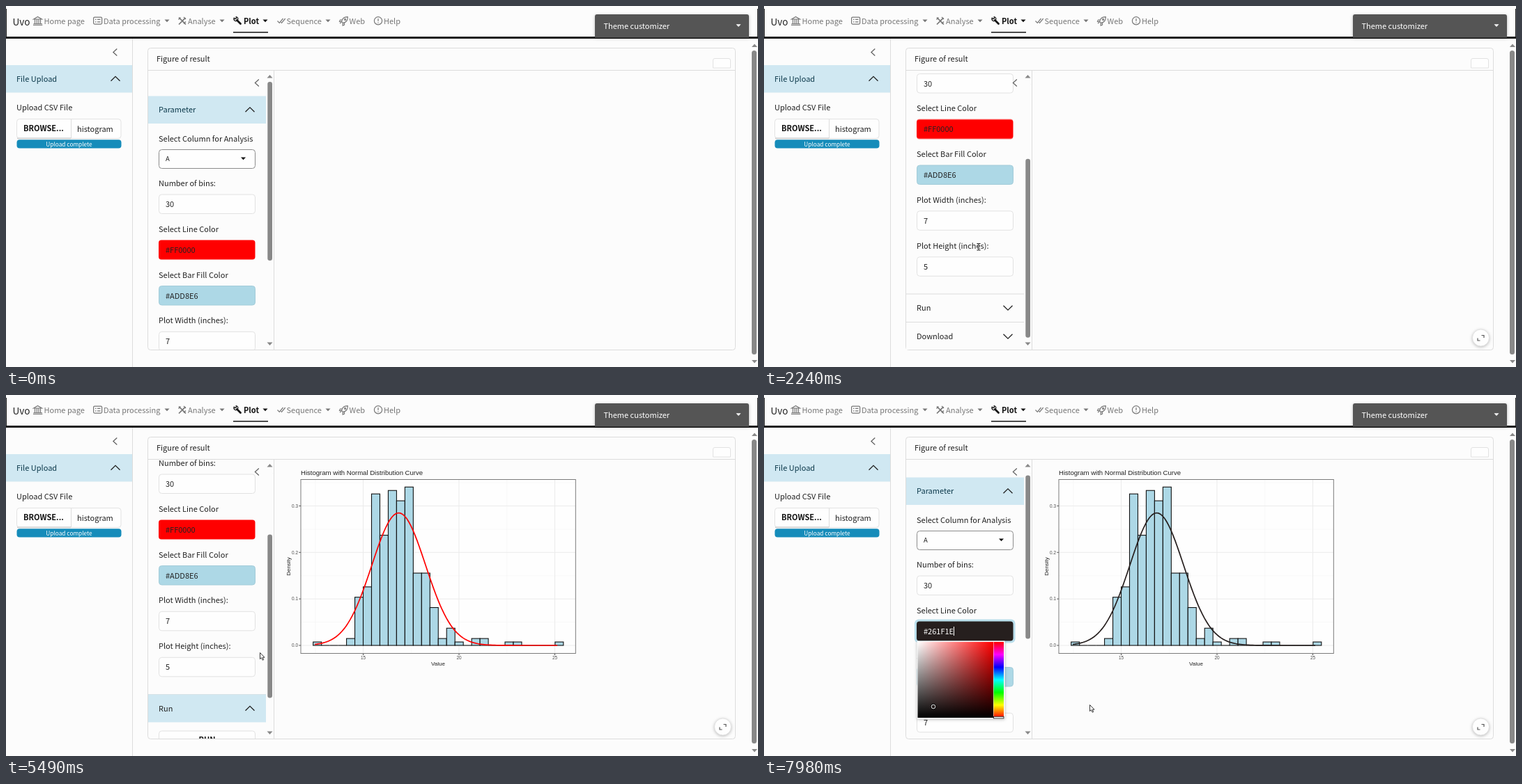
An HTML page that plays this animation: 1079 by 519 pixels, repeating every 8000 ms.

```html
<!DOCTYPE html>
<html lang="en">
<head>
<meta charset="utf-8">
<title>Histogram app</title>
<style>
@property --scroll { syntax: '<number>'; inherits: true; initial-value: 0; }
@property --open { syntax: '<number>'; inherits: true; initial-value: 0; }

html, body { margin: 0; width: 100%; height: 100%; overflow: hidden; background: #fcfcfc; }
#stage {
  display: block; width: 1079px; height: 519px;
  font: 11px "Noto Sans CJK SC", "Noto Sans CJK JP", "Noto Sans", sans-serif;
  fill: #222;
  animation: scroll 8s ease-out infinite, open 8s ease-in-out infinite;
}
text { white-space: pre; }
.line { fill: none; stroke: #dcdcdc; }
.in { fill: #fefefe; stroke: #e2e2e2; }
.head { fill: #d0e8f2; }
.on { fill: #0d3a4c; }
.chev { fill: none; stroke: #222; stroke-width: 1.3; }
.nav { fill: #777; }
.ico { fill: none; stroke: #777; stroke-width: 1.2; }
.grey { fill: #888; }
.bold { font-weight: 700; fill: #111; }
.mid { text-anchor: middle; }
.end { text-anchor: end; }
.shade { filter: drop-shadow(0 1px 2px #0004); }

.plot { font-family: "Liberation Sans", Arial, sans-serif; }
.tick { font-size: 6.4px; fill: #4d4d4d; }
.minor { stroke: #f2f2f2; stroke-width: .5; }
.major { stroke: #ebebeb; }

/* scroll area */
.content { transform: translateY(calc(var(--scroll) * -1px)); }
.below { transform: translateY(calc(var(--open) * 55px)); }
.flip { transform: rotate(calc(var(--open) * 180deg)); }
.thumb {
  height: calc(148304px / (577 + 54 * var(--open)));
  transform: translateY(calc(var(--scroll) * 368px / (577 + 54 * var(--open))));
}
@keyframes scroll {
  0%, 21.6% { --scroll: 0; animation-timing-function: linear; }
  22.75%, 23.3% { --scroll: 42; animation-timing-function: linear; }
  26% { --scroll: 130; }
  28%, 40.75% { --scroll: 173.5; }
  43.6%, 65% { --scroll: 226.5; }
  68.4%, 69.2% { --scroll: 157; }
  71.8% { --scroll: 84; }
  75%, 100% { --scroll: 11; }
}
@keyframes open {
  0%, 38.1% { --open: 0; }
  42.4%, 100% { --open: 1; }
}

/* fades */
.expand { animation: expand 8s infinite; }
.runHead { animation: runHead 8s infinite; }
.popup { animation: popup 8s linear infinite; }
@keyframes expand { 0%, 5% { opacity: 0; } 6.6%, 100% { opacity: 1; } }
@keyframes runHead { 0%, 38.1% { opacity: 0; } 40%, 100% { opacity: 1; } }
@keyframes popup { 0%, 82% { opacity: 0; } 83.3%, 83.9% { opacity: .76; } 84.8%, 100% { opacity: 1; } }

/* hard changes */
.runRing, .press, .plot, .curve, .field, .glow, .red, .dark,
.arrow, .hand, .beam, .cross { animation: 8s step-end infinite; }
.runRing { animation-name: runRing; }
.press { animation-name: press; }
.plot { animation-name: plot; }
.curve { animation-name: curve; fill: none; stroke-width: 1.7; }
.field { animation-name: field; }
.glow { animation-name: glow; }
.red { animation-name: red; }
.dark { animation-name: dark; fill: #fff; }
@keyframes runRing { 0% { opacity: 0; } 38.1% { opacity: 1; } 45.5% { opacity: 0; } }
@keyframes press { 0% { transform: none; } 45.5% { transform: translateY(1px); } 47.5% { transform: none; } }
@keyframes plot { 0% { opacity: 0; } 58.5% { opacity: 1; } }
@keyframes curve { 0% { stroke: #f00; } 96.2% { stroke: #261f1e; } }
@keyframes field { 0% { fill: #f00; } 90.8% { fill: #261f1e; } }
@keyframes glow { 0% { opacity: 0; } 80.25% { opacity: 1; } }
@keyframes red { 0% { opacity: 1; } 90.8% { opacity: 0; } }
@keyframes dark { 0% { opacity: 0; } 90.8% { opacity: 1; } }

.picker { animation: pick 8s infinite; }
@keyframes pick {
  0%, 90.5% { transform: translate(329px, 355px); }
  91.4%, 100% { transform: translate(243px, 448px); }
}

/* pointer */
.cur { animation: move 8s ease-in-out infinite; }
.inv { mix-blend-mode: difference; fill: none; stroke: #fff; }
.arrow { animation-name: arrow; }
.hand { animation-name: hand; }
.beam { animation-name: beam; }
.cross { animation-name: cross; }
@keyframes move {
  0%, 2.25% { transform: translate(268px, 8px); }
  9.9%, 28.7% { transform: translate(308px, 346px); }
  31.5% { transform: translate(319px, 402px); }
  35.6%, 38% { transform: translate(302px, 433px); }
  42.5%, 48.6% { transform: translate(297px, 424px); }
  53.25%, 75% { transform: translate(364px, 370px); }
  77.4%, 84.5% { transform: translate(331px, 341px); }
  89.75%, 96.1% { transform: translate(243px, 448px); }
  99.7%, 100% { transform: translate(467px, 445px); }
}
@keyframes arrow {
  0% { opacity: 0; } 2.25% { opacity: 1; } 8% { opacity: 0; }
  49.5% { opacity: 1; } 76.25% { opacity: 0; } 97.3% { opacity: 1; }
}
@keyframes beam {
  0% { opacity: 0; } 8% { opacity: 1; } 30.5% { opacity: 0; }
  76.25% { opacity: 1; } 85.5% { opacity: 0; }
}
@keyframes hand { 0% { opacity: 0; } 30.5% { opacity: 1; } 49.5% { opacity: 0; } }
@keyframes cross { 0% { opacity: 0; } 85.5% { opacity: 1; } 97.3% { opacity: 0; } }
</style>
</head>
<body>
<svg id="stage" viewBox="0 0 1079 519">
  <defs>
    <linearGradient id="sat"><stop stop-color="#fff"/><stop offset="1" stop-color="#f00"/></linearGradient>
    <linearGradient id="val" x2="0" y2="1"><stop stop-opacity="0"/><stop offset="1"/></linearGradient>
    <linearGradient id="hue" x2="0" y2="1">
      <stop stop-color="#f00"/><stop offset=".167" stop-color="#f0f"/><stop offset=".333" stop-color="#00f"/>
      <stop offset=".5" stop-color="#0ff"/><stop offset=".667" stop-color="#0f0"/>
      <stop offset=".833" stop-color="#ff0"/><stop offset="1" stop-color="#f00"/>
    </linearGradient>
    <path id="up" d="M-6.5 3.2L0-3.2L6.5 3.2"/>
    <path id="back" d="M2.8-5L-2.6 0L2.8 5"/>
    <path id="caret" d="M-3.5-1.8h7L0 1.9z"/>
    <path id="tri" d="M-4 2h8L0-2.6z"/>
  </defs>
  <rect width="1079" height="519" fill="#fcfcfc"/>

  <!-- top bar -->
  <path d="M.5 4V45M1078.5 4V45" stroke="#222"/>
  <rect y="44" width="1079" height="3" fill="#1a1a1a"/>
  <text x="9.5" y="27.5" font-size="13.6">Uvo</text>
  <g class="nav">
    <text x="54.5" y="25.5">Home page</text>
    <text x="140" y="25.5">Data processing</text>
    <text x="261" y="25.5">Analyse</text>
    <text x="341" y="25.5" class="bold">Plot</text>
    <text x="402.5" y="25.5">Sequence</text>
    <text x="492.5" y="25.5">Web</text>
    <text x="542" y="25.5">Help</text>
    <use href="#caret" x="231" y="21.3"/>
    <use href="#caret" x="310" y="21.3"/>
    <use href="#caret" x="372" y="21.3" fill="#111"/>
    <use href="#caret" x="462" y="21.3"/>
  </g>
  <g class="ico">
    <path d="M39.5 19L45.5 15.5L51.5 19zM41.5 19.5V25M44.3 19.5V25M46.9 19.5V25M49.5 19.5V25M39.5 25.5H51.8M39 27.3H52.3"/>
    <rect x="125.6" y="16.1" width="12" height="10" rx="1.5"/>
    <path d="M128 19.3h1.5M131 19.3h4.5M128 22.8h1.5M131 22.8h4.5"/>
    <path d="M248 16.5L258 26.5M257.5 17L248 26.5" stroke-width="1.7"/>
    <path d="M247.5 19.5l3-3M255 25.5l3-3M255 16l3 3"/>
    <path d="M389.5 21.5l2.8 2.8l5.2-6.3M394.5 23.3l1 1l5.2-6.3"/>
    <path d="M481.5 22.5C482.5 18 486 15.5 490.3 15.7C490.5 20 488 23.5 483.5 24.5zM482.5 20h-3l-1 2.5h3M485.5 24v3l-2.3 1v-3M479 25l2-1.5"/>
    <circle cx="486.6" cy="19.4" r="1"/>
    <circle cx="534" cy="21.3" r="5.6"/>
    <path d="M534 18v4M534 23.5v1.3"/>
    <path d="M331.5 20.5L336.5 25.5" stroke="#111" stroke-width="2.8" stroke-linecap="round"/>
    <path d="M327.2 17.2A3 3 0 1 0 330.2 15.6V18.4H328z" stroke="#111"/>
  </g>
  <rect x="326" y="37" width="50" height="1.6" fill="#222"/>
  <path class="shade" d="M845 45.5V15a3 3 0 0 1 3-3h215a3 3 0 0 1 3 3V45.5z" fill="#555"/>
  <text x="857.5" y="32.5" fill="#fff">Theme customizer</text>
  <use href="#caret" x="1051" y="28" fill="#fff"/>

  <!-- left sidebar -->
  <path class="line" d="M181.5 47V519"/>
  <g class="chev"><use href="#back" x="156.5" y="66.5" stroke="#666"/></g>
  <rect class="head" y="85" width="181" height="39.5"/>
  <text class="on" x="15" y="109">File Upload</text>
  <use class="chev" href="#up" x="157" y="104.5"/>
  <text x="15" y="150">Upload CSV File</text>
  <rect class="in" x="15.5" y="162.5" width="149.5" height="28" rx="4"/>
  <path d="M93.5 163V190" class="line"/>
  <path d="M16 190.3H93" stroke="#d4d4d4" stroke-width="2"/>
  <text x="25" y="180" class="bold">BROWSE...</text>
  <text x="102" y="180.5">histogram</text>
  <rect x="15.5" y="192.3" width="150" height="12.2" rx="4" fill="#158cba"/>
  <text x="90.5" y="201.5" class="mid" font-size="8.3" fill="#fff">Upload complete</text>

  <!-- page scrollbar -->
  <g class="grey">
    <use href="#tri" x="1074" y="57"/>
    <rect x="1070" y="64" width="7" height="437" rx="3.5"/>
    <use href="#tri" transform="translate(1074 511) scale(1 -1)"/>
  </g>

  <!-- card -->
  <rect class="line" x="203.5" y="60.5" width="843" height="434" rx="4"/>
  <path class="line" d="M204 92.5H1046M384.5 93V494"/>
  <text x="216" y="80">Figure of result</text>
  <path class="in" d="M1014.5 89V78a2.5 2.5 0 0 1 2.5-2.5h20a2.5 2.5 0 0 1 2.5 2.5V89z"/>

  <svg x="204" y="93" width="180" height="401"><g transform="translate(-204 -93)">
    <g class="content">
      <rect class="head" x="204" y="129.5" width="169" height="39.5"/>
      <text class="on" x="219" y="153">Parameter</text>
      <use class="chev" href="#up" x="350" y="149"/>
      <text x="219" y="194.7">Select Column for Analysis</text>
      <rect class="in" x="219.5" y="206.5" width="138" height="27" rx="4" style="stroke:#8c8c8c"/>
      <text x="229" y="223" font-size="9.5">A</text>
      <use href="#caret" x="340.5" y="219.3" fill="#111"/>
      <text x="219" y="258.7">Number of bins:</text>
      <rect class="in" x="219.5" y="271" width="138" height="27.5" rx="4"/>
      <text x="229" y="289">30</text>
      <text x="219" y="324.7">Select Line Color</text>
      <rect class="glow" x="216" y="333.5" width="144.5" height="34" rx="6" fill="#b9deeb"/>
      <rect class="field" x="219" y="336.5" width="138.5" height="28" rx="4"/>
      <text class="red" x="229" y="354.6">#FF0000</text>
      <text class="dark" x="229" y="354.6">#261F1E</text>
      <g class="glow"><path class="red" d="M271.5 344v13" stroke="#111"/><path class="dark" d="M272.5 344v13" stroke="#fff"/></g>
      <text x="219" y="390.5">Select Bar Fill Color</text>
      <rect x="219.5" y="402.5" width="138" height="27.5" rx="4" fill="#add8e6" stroke="#a3ccd9"/>
      <text x="229" y="420.5">#ADD8E6</text>
      <text x="219" y="456.4">Plot Width (inches):</text>
      <rect class="in" x="219.5" y="468.3" width="138" height="27.5" rx="4"/>
      <text x="229" y="486.4">7</text>
      <text x="219" y="522.2">Plot Height (inches):</text>
      <rect class="in" x="219.5" y="534.3" width="138" height="27.5" rx="4"/>
      <text x="229" y="552.4">5</text>

      <path class="line" d="M204 587.5H373"/>
      <g class="runHead">
        <rect class="head" x="204" y="587.5" width="169" height="40"/>
        <rect class="runRing" x="203" y="586.5" width="170" height="42" fill="none" stroke="#b4d6e4" stroke-width="3"/>
      </g>
      <text x="219" y="611.7">Run</text>
      <g transform="translate(350 607.5)"><path class="chev flip" d="M-6.5-3.2L0 3.2L6.5-3.2"/></g>
      <g class="press">
        <rect class="in" x="219.5" y="640" width="138" height="29" rx="4"/>
        <path d="M221 668.5H356" stroke="#d2d2d2" stroke-width="2.5"/>
        <text class="bold mid" x="288.5" y="657.3">RUN</text>
      </g>
      <g class="below">
        <rect x="204" y="628" width="169" height="100" fill="#fcfcfc"/>
        <path class="line" d="M204 628H373"/>
        <text x="219" y="652.3">Download</text>
        <path class="chev" d="M343.5 645.3L350 651.7L356.5 645.3"/>
      </g>
    </g>
    <g class="chev"><use href="#back" x="360" y="110.5" stroke="#666"/></g>
    <g class="grey">
      <rect x="373" y="93" width="11" height="401" fill="#fcfcfc"/>
      <use href="#tri" x="378.5" y="101.5"/>
      <rect class="thumb" x="375.3" y="109" width="6.7" rx="3.3"/>
      <use href="#tri" transform="translate(378.5 485.5) scale(1 -1)"/>
    </g>
  </g></svg>

  <g class="plot">
    <g id="grid"></g>
    <g id="bars" fill="#add8e6" stroke="#111" stroke-width="1.1"></g>
    <path id="curve" class="curve"/>
    <rect x="423" y="121.5" width="394.3" height="250" fill="none" stroke="#7a7a7a"/>
    <text x="423" y="115.3" font-size="9.55">Histogram with Normal Distribution Curve</text>
    <text class="mid" x="620" y="388.5" font-size="8">Value</text>
    <text class="mid" font-size="8" transform="translate(407.5 246.5) rotate(-90)">Density</text>
  </g>

  <g class="expand">
    <circle class="shade" cx="1028.5" cy="477" r="12" fill="#fefefe" stroke="#ddd" stroke-width=".8"/>
    <path d="M1029.5 473.5h3.5v3.5M1027.5 481h-3.5v-3.5" fill="none" stroke="#555" stroke-width="1.2"/>
  </g>

  <g class="popup">
    <rect class="shade" x="219.5" y="353.5" width="126" height="112" fill="#fcfcfc"/>
    <rect x="220.5" y="355" width="108.5" height="109" fill="url(#sat)"/>
    <rect x="220.5" y="355" width="108.5" height="109" fill="url(#val)"/>
    <rect x="329.5" y="355" width="14.5" height="109" fill="url(#hue)"/>
    <rect x="329.5" y="462.3" width="14.5" height="2.6" fill="#fff" stroke="#111" stroke-width=".8"/>
    <g class="picker" fill="none">
      <circle r="3.4" stroke="#000" stroke-width="1.6"/>
      <circle r="2.9" stroke="#fff" stroke-width=".9"/>
    </g>
  </g>

  <g class="cur inv">
    <path class="beam" d="M-2.5-4.5H-.7L0-4L.7-4.5H2.5M0-4V4.5M-2.5 5H-.7L0 4.5L.7 5H2.5"/>
    <path class="cross" d="M-7 0H7M0-7V7"/>
  </g>
  <g class="cur" fill="#fff" stroke="#222" stroke-width=".9" stroke-linejoin="round">
    <path class="arrow" d="M.5.5V9.6L2.6 7.7L4.2 11.2L5.7 10.5L4.2 7.2H7z"/>
    <path class="hand" d="M-1 1.2a1 1 0 0 1 2 0V5L4 5.6Q5.2 6 5 7.4L4.3 11V12.6H-.7V11.2L-3.2 7.9Q-3.2 6.6-1.9 7L-1 7.9z"/>
  </g>
</svg>

<script>
const byId = id => document.getElementById(id);
const px = v => 512.5 + (v - 15) * 27.5;
const py = d => 360 - d * 668.5;

// grid, ticks and axis numbers
let grid = '<rect x="423" y="121.5" width="394" height="250" fill="#fefefe"/>';
const vLine = (x, kind) => `<path class="${kind}" d="M${x} 122V371"/>`;
const hLine = (y, kind) => `<path class="${kind}" d="M423 ${y}H817"/>`;
for (const v of [12.5, 17.5, 22.5]) grid += vLine(px(v), 'minor');
for (const d of [.05, .15, .25, .35]) grid += hLine(py(d), 'minor');
for (const v of [15, 20, 25]) {
  const x = px(v);
  grid += vLine(x, 'major') + `<path d="M${x} 371.5v2.6" stroke="#444"/>
    <text class="tick mid" x="${x}" y="380">${v}</text>`;
}
for (const d of [0, .1, .2, .3]) {
  const y = py(d);
  grid += hLine(y, 'major') + `<path d="M423 ${y}h-2.6" stroke="#444"/>
    <text class="tick end" x="419" y="${y + 2.2}">${d.toFixed(1)}</text>`;
}
byId('grid').innerHTML = grid;

const counts = [1, 0, 0, 0, 2, 14, 17, 44, 32, 45, 42, 46, 21, 21, 11,
  2, 5, 1, 0, 2, 2, 0, 0, 1, 1, 0, 0, 0, 0, 1];
const barW = 11.97;
byId('bars').innerHTML = counts.map((n, i) => {
  const x = 440.7 + i * barW, h = n * 4.95;
  return n ? `<rect x="${x}" y="${360 - h}" width="${barW}" height="${h}"/>`
           : `<path d="M${x} 360h${barW}"/>`;
}).join('');

// normal density, mean 16.85, sd 1.4
let path = '';
for (let x = 443; x <= 791; x += 3) {
  const z = (x - 563.5) / 38.5;
  path += `${path ? 'L' : 'M'}${x} ${(360 - 190.5 * Math.exp(-z * z / 2)).toFixed(2)}`;
}
byId('curve').setAttribute('d', path);
</script>
</body>
</html>
```
